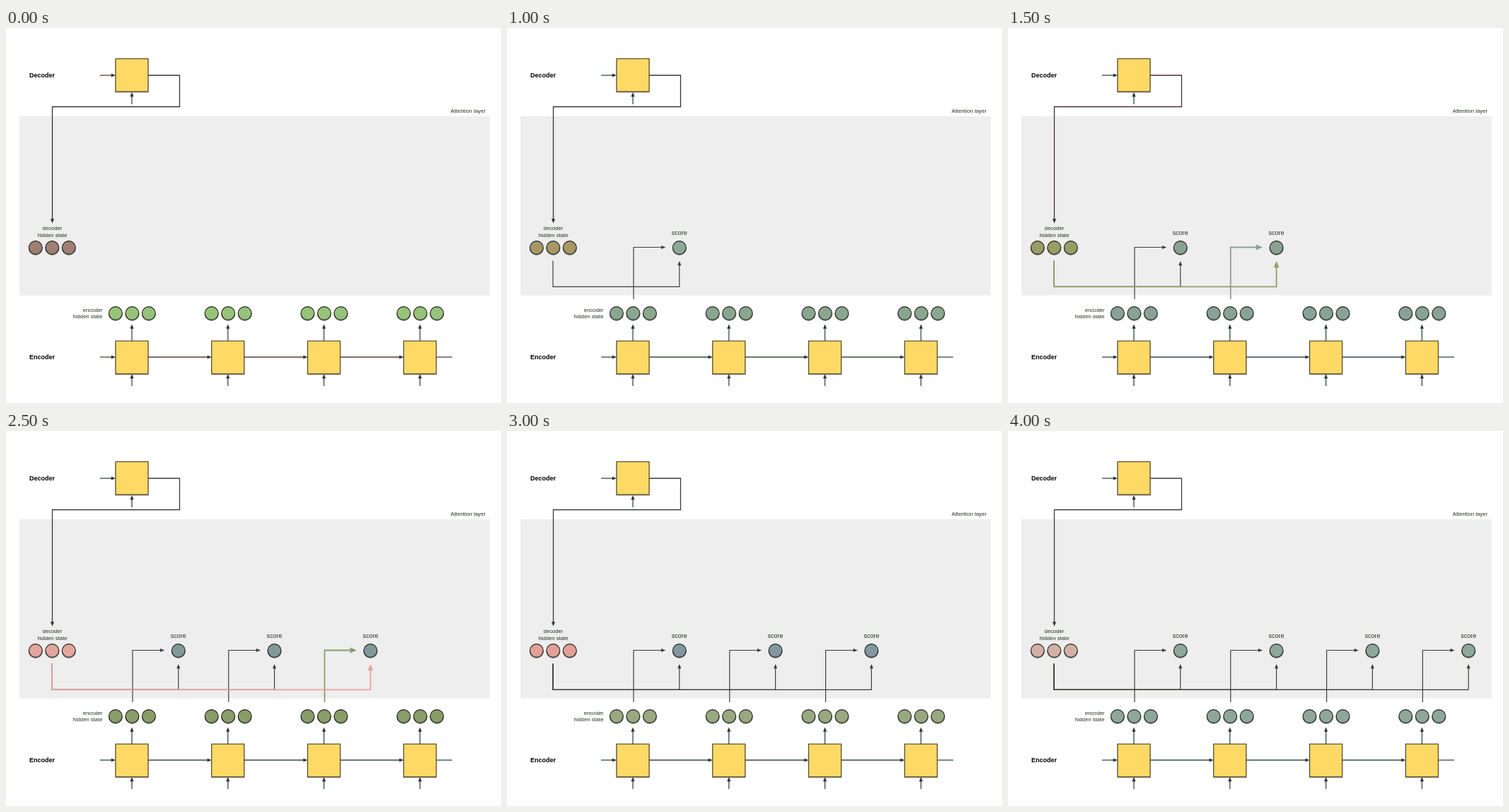
An HTML page for the animation above (5000 ms loop, 700 by 531 pixels).

```html
<!DOCTYPE html>
<html lang="en">
<head>
<meta charset="utf-8">
<title>Attention scores</title>
<style>
html, body { margin: 0; width: 100%; height: 100%; overflow: hidden; background: #fff; }
svg {
  display: block; width: 100%; height: 100%;
  --dark: #3c403a;
  font: 7.7px "Liberation Sans", Arial, sans-serif; fill: #24301f;
  animation: tones 5s step-end infinite;
}
.bold { font-weight: bold; font-size: 9px; fill: #000; }
.score { font-size: 9px; }
.wire { fill: none; stroke: var(--line); stroke-width: 1.3px; }
.long { stroke: var(--long); }
.head { fill: #333; }
.box { fill: #ffd966; stroke: #4a4022; stroke-width: 1.1px; }
.dot { stroke: #262b22; stroke-width: 1.2px; }
.box, .dot { filter: drop-shadow(.6px 1px .7px rgba(0, 0, 0, .4)); }
.dec { fill: var(--dec); }
.enc { fill: var(--enc); }
.sc { fill: var(--sc); }
.col .wire { stroke-width: var(--w); }
.col .head { transform: scale(var(--k)); }
.col .wire.a { stroke: var(--a); }
.col .wire.b { stroke: var(--b); }
.col .head.a { fill: var(--a); }
.col .head.b { fill: var(--b); }

/* fill and line tones of each step */
@keyframes tones {
  0%        { --dec: #a07f73; --enc: #96c47a; --sc: #bcc8bc; --line: #5c3c35; --long: #333; }
  10%       { --dec: #b09062; --enc: #8aa888; --sc: #bac5b9; --line: #35563c; --long: #333; }
  20%       { --dec: #a89666; --enc: #8aa68e; --sc: #8ea898; --line: #33503f; --long: #383434; }
  30%       { --dec: #989d66; --enc: #89a296; --sc: #89a296; --line: #2f4a4a; --long: #4d2c33; }
  40%       { --dec: #c4a288; --enc: #8a9f80; --sc: #869d98; --line: #2f4a4a; --long: #3b3838; }
  50%       { --dec: #e4a59d; --enc: #8a9c68; --sc: #82999b; --line: #2f4a4a; --long: #3b3838; }
  60%       { --dec: #e2a098; --enc: #98a880; --sc: #82979f; --line: #33494c; --long: #3b3838; }
  70%       { --dec: #e39e97; --enc: #a8b79b; --sc: #8197a3; --line: #33494c; --long: #3b3838; }
  80%, 100% { --dec: #d3b0a6; --enc: #8da798; --sc: #8da798; --line: #34504a; --long: #3f3a3d; }
}
</style>
</head>
<body>
<svg id="stage" viewBox="0 0 700 531"></svg>
<script>
const GAP = 135.8;

const wire = (d, cls = '') => `<path class="wire ${cls}" d="${d}"/>`;
const head = (x, y, turn, cls = '') =>
  `<g transform="translate(${x} ${y}) rotate(${turn})"><path class="head ${cls}" d="M0 0L-6.2 -2.6V2.6Z"/></g>`;
const right = (x0, x1, y) => wire(`M${x0} ${y}H${x1 - 4}`) + head(x1, y, 0);
const up = (x, y0, y1) => wire(`M${x} ${y0}V${y1 + 4}`) + head(x, y1, -90);
const box = (x, y) => `<rect class="box" x="${x}" y="${y}" width="46" height="46.5"/>`;
const dot = (x, y, cls) => `<circle class="dot ${cls}" cx="${x}" cy="${y}" r="9.4"/>`;
const trio = (x, y, cls) => [-23.5, 0, 23.5].map(dx => dot(x + dx, y, cls)).join('');
const text = (x, y, str, anchor = 'start', cls = '') =>
  `<text class="${cls}" x="${x}" y="${y}" text-anchor="${anchor}">${str}</text>`;

const decoder =
  text(33, 70, 'Decoder', 'start', 'bold') +
  right(133, 155, 67) + up(178, 108, 91) + box(155, 43.5) +
  wire('M201 67H245.5V111.5H65.5V272', 'long') + head(65.5, 276.5, 90) +
  text(65.5, 286, 'decoder', 'middle') + text(65.5, 295.5, 'hidden state', 'middle') +
  trio(65.3, 311, 'dec');

function encoderCell(i) {
  const x = 178 + i * GAP;
  const inlet = i ? x - GAP + 23 : 133;
  return right(inlet, x - 23, 466) + up(x, 507, 490) + up(x, 443, 419.5) +
    box(x - 23, 443.2) + trio(x + .4, 404, 'enc');
}

function scoreColumn(i) {
  const x = 179 + i * GAP, sx = 243.8 + i * GAP;
  return `<g class="col" style="animation:col${i} 5s step-end infinite">` +
    wire(`M${x} 384V310.5H${sx - 25}`, 'a') + head(sx - 19.5, 310.5, 0, 'a') +
    wire(`M65 329.5V366.3H${sx}V336`, 'b') + head(sx, 330, -90, 'b') +
    text(sx, 293, 'score', 'middle', 'score') + dot(sx, 311, 'sc') + '</g>';
}

// Each column appears highlighted, then settles to dark lines.
function columnRule(i) {
  const at = 10 + 20 * i;
  return `@keyframes col${i} {
    0% { visibility: hidden }
    ${at}% { visibility: visible; --a: var(--enc); --b: var(--dec); --w: 1.8px; --k: 1.5 }
    ${at + 10}%, 100% { visibility: visible; --a: var(--dark); --b: var(--dark); --w: 1.2px; --k: 1 }
  }`;
}

const cols = [0, 1, 2, 3];
document.getElementById('stage').innerHTML =
  `<style>${cols.map(columnRule).join('')}</style>` +
  '<rect x="19" y="125" width="665" height="253.5" fill="#eee"/>' +
  text(678, 119.5, 'Attention layer', 'end') + decoder +
  text(33, 469.3, 'Encoder', 'start', 'bold') +
  text(136.5, 402, 'encoder', 'end') + text(136.5, 411, 'hidden state', 'end') +
  wire('M608 466H631') +
  cols.map(encoderCell).join('') + cols.map(scoreColumn).join('');
</script>
</body>
</html>
```
